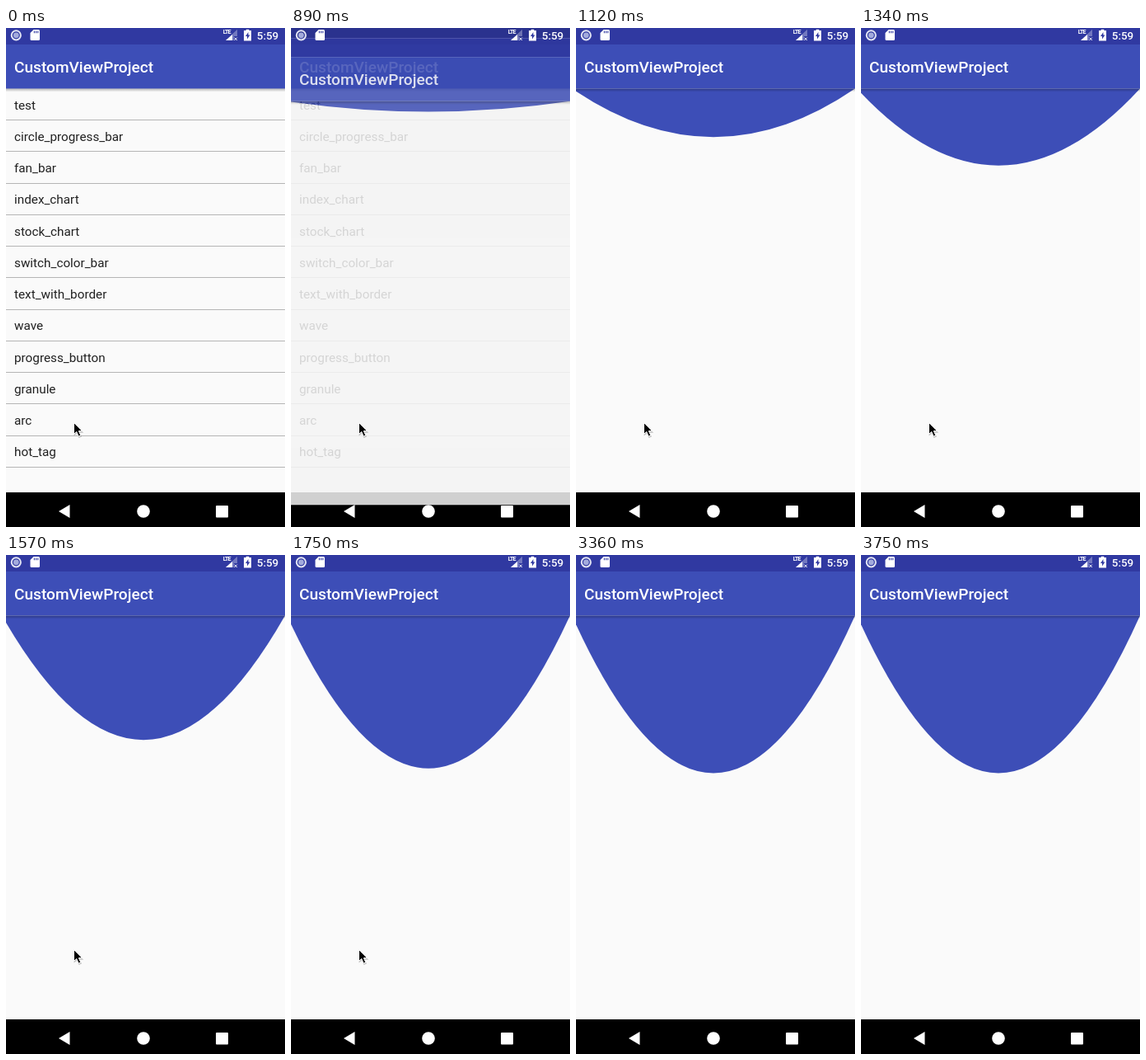
Animation, 339 px wide and 605 px high, one loop 4.36 s. Source, as an HTML page:

```html
<!DOCTYPE html>
<html lang="en">
<head>
<meta charset="utf-8">
<title>CustomViewProject</title>
<style>
  html, body { margin: 0; width: 100%; height: 100%; overflow: hidden; background: #000; }
  svg { display: block; width: 339px; height: 605px; font-family: Roboto, sans-serif; }
  .title { font-size: 19.1px; font-weight: 500; fill: #fff; }
  .row { font-size: 15.29px; fill: #212121; }
  .clock { font-size: 13.4px; font-weight: 500; }
</style>
</head>
<body>
<svg viewBox="0 0 339 605">
  <defs>
    <linearGradient id="shade" x2="0" y2="1">
      <stop stop-opacity=".27"/>
      <stop offset="1" stop-opacity="0"/>
    </linearGradient>
    <g id="bars">
      <path fill="#3039a1" d="M0-3h339v23H0z"/>
      <path fill="#3d4eb7" d="M0 20h339v53.4H0z"/>
      <path fill="url(#shade)" d="M0 73.4h339v4.2H0z"/>
      <path d="M0 563h339v60H0z"/>
      <text class="title" x="10" y="53.8">CustomViewProject</text>
    </g>
  </defs>

  <g id="list">
    <path fill="#fafafa" d="M0 0h339v605H0z"/>
    <g id="rows"></g>
    <use href="#bars"/>
  </g>

  <g id="detail">
    <path fill="#fafafa" d="M0-3h339v608H0z"/>
    <path id="arc" fill="#3d4eb7"/>
    <use href="#bars"/>
  </g>

  <g id="system" fill="#fff">
    <circle cx="12.3" cy="8.8" r="5.6" fill="none" stroke="#e4e6f4" stroke-width="2"/>
    <circle cx="12.3" cy="8.8" r="3.4" fill="#a3abdc"/>
    <path d="M33.5 2H39.5Q41 2 41 3.5V13.5Q41 15 39.5 15H31Q29.5 15 29.5 13.5V6z"/>
    <path stroke="#3039a1" stroke-width="1.1" d="M34.4 3.6v2.6M36.6 3.6v2.6M38.8 3.6v2.6"/>
    <path fill-opacity=".32" d="M281 1.8V10h-4v5h-10z"/>
    <path d="M275 8v7h-8z"/>
    <path stroke="#fff" stroke-width="1" d="M277.4 11.6l3.4 3.4m0-3.4l-3.4 3.4"/>
    <text x="263.8" y="7.4" font-size="7.2" font-weight="700" letter-spacing="-.9">LTE</text>
    <path d="M291.7 1.8h3.6v1.3h2.7v12.4h-9V3.1h2.7z"/>
    <path fill="#3039a1" d="M294.4 5l-3.4 5h2v3.6l3.4-5h-2z"/>
    <text class="clock" x="304.8" y="13.7">5:59</text>
    <path d="M64 586l13.5-8v16z"/>
    <circle cx="167" cy="586" r="7.8"/>
    <rect x="255" y="579" width="15" height="14.5" rx="1"/>
  </g>

  <g id="cursor">
    <path opacity=".22" d="M.6 1.6v15l3.5-2.8 2.4 5.2 3.5-1.4-2.3-4.8h4.6z"/>
    <path stroke="#fff" d="M.5.6v13.8l3.2-2.9 2.5 5.6 2.6-1.1-2.4-5.4h4.3z"/>
  </g>
</svg>

<script>
const LOOP = 4360, OPEN = 889, STEP = 56.8;
const el = id => document.getElementById(id);
const names = ['test', 'circle_progress_bar', 'fan_bar', 'index_chart', 'stock_chart',
  'switch_color_bar', 'text_with_border', 'wave', 'progress_button', 'granule', 'arc', 'hot_tag'];

el('rows').innerHTML = names.map((name, i) => {
  const y = i * 38.27;
  return `<text class="row" x="10" y="${98.5 + y}">${name}</text>
    <path fill="#b5b5b5" d="M0 ${Math.round(111 + y)}h339v1H0z"/>`;
}).join('');

const progress = (t, from, to) => Math.min(1, Math.max(0, (t - from) / (to - from)));
const easeOut = (p, power) => 1 - (1 - p) ** power;

function cursorAt(t) {
  if (t < 2380) {
    const a = progress(t, 1755, 1912), b = progress(t, 1912, 2366);
    return [82 + 84 * a + 150 * b, 478 + 57 * a + 71 * b];
  }
  const p = progress(t, 3345, 3730);
  return [232 - 152 * p, 606 - 104 * p * (1 - p)];
}

function draw(time) {
  const t = time < OPEN ? 0 : OPEN + Math.floor((time - OPEN) / STEP) * STEP;
  const opened = t >= OPEN;
  const slide = 48.4 * (1 - easeOut(progress(t, 817, 1167), 5));
  const depth = Math.min(191, Math.max(0, (t - 826) * 0.2025));

  el('list').setAttribute('opacity', 1 - 0.3 * progress(t, 817, 1000));
  el('detail').setAttribute('opacity', opened ? easeOut(progress(t, 817, 1017), 4) : 0);
  el('detail').setAttribute('transform', `translate(0 ${slide})`);
  el('arc').setAttribute('d', `M-5 73.4Q167 ${73.4 + 2 * depth} 339 73.4z`);
  el('cursor').setAttribute('transform', `translate(${cursorAt(t)})`);
}

function tick() {
  draw(performance.now() % LOOP);
  requestAnimationFrame(tick);
}
tick();
</script>
</body>
</html>
```
